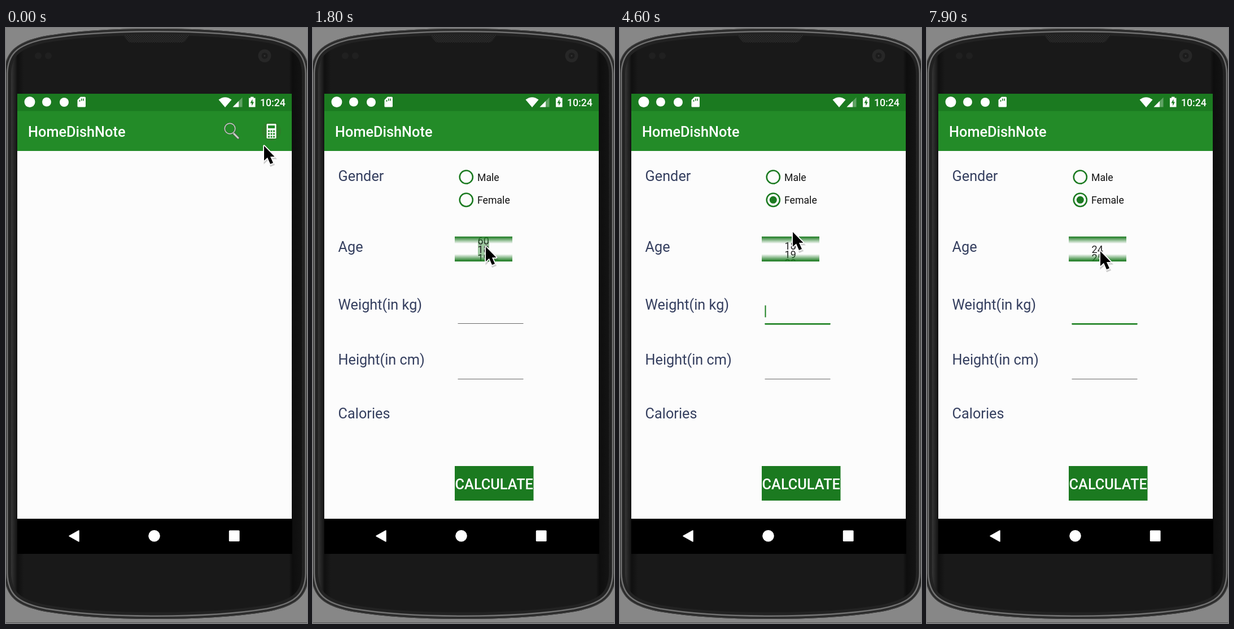
Recreate the animation shown at these times as an HTML page. Size 533 px wide and 1050 px high, loop 8 s.

```html
<!DOCTYPE html>
<html lang="en">
<head>
<meta charset="utf-8">
<title>Calorie form</title>
<style>
html, body { margin: 0; width: 100%; height: 100%; overflow: hidden; background: #878787; }
svg { display: block; width: 100%; height: 100%; font-family: Roboto, sans-serif; }
.title { font-size: 25.3px; font-weight: 500; fill: #fff; }
.label { font-size: 25.3px; fill: #353f5f; }
.option { font-size: 17.7px; fill: #111; }
.row { font-size: 18px; fill: #222; text-anchor: middle; }
.ring { fill: none; stroke: #1b7a20; stroke-width: 2.5; r: 11.6px; }

/* Everything shares one 8 s clock; a step is 100 ms = 1.25 %. */
.anim { animation: 8s step-end infinite; }
#home { animation-name: leave; }
#ripple { animation-name: ripple; }
#window { animation-name: open; }
#cursor { animation-name: point; }
#ring { animation-name: press; }
#dot { animation-name: check; }
#rows { animation-name: spin; }
#cover { animation-name: cover; transform-origin: 0 368px; }
#selection { animation-name: unselect; }
#focus { animation-name: focus; }
#caret { animation: blink 1s step-end infinite; }

@keyframes leave {
  0% { opacity: 1; }
  11.25% { opacity: .96; }
  13.75%, 100% { opacity: 1; }
}
@keyframes ripple {
  0% { opacity: .15; animation-timing-function: steps(3); }
  3.75%, 100% { opacity: 0; }
}
@keyframes open {
  0% { opacity: 0; transform: translateY(65px); }
  10% { opacity: .1; transform: translateY(58px); }
  11.25% { opacity: .67; transform: translateY(30.5px); }
  12.5% { opacity: .97; transform: translateY(4px); }
  13.75%, 100% { opacity: 1; transform: none; }
}
@keyframes point {
  0% { transform: translate(456px, 206px); animation-timing-function: steps(3); }
  3.75% { transform: translate(463px, 185px); }
  13.75% { transform: translate(463px, 185px); animation-timing-function: steps(7); }
  22.5% { transform: translate(305px, 384px); }
  27.5% { transform: translate(305px, 384px); animation-timing-function: steps(5); }
  33.75% { transform: translate(268px, 302px); }
  40% { transform: translate(268px, 302px); animation-timing-function: steps(10); }
  52.5% { transform: translate(305px, 390px); }
  55% { transform: translate(305px, 390px); animation-timing-function: steps(2); }
  57.5% { transform: translate(305px, 358px); animation-timing-function: steps(3); }
  61.25% { transform: translate(308px, 320px); animation-timing-function: steps(5); }
  67.5% { transform: translate(306px, 392px); animation-timing-function: steps(4); }
  72.5% { transform: translate(310px, 322px); animation-timing-function: steps(4); }
  77.5% { transform: translate(308px, 392px); animation-timing-function: steps(4); }
  82.5% { transform: translate(317px, 317px); }
  91.25% { transform: translate(317px, 317px); animation-timing-function: steps(6); }
  98.75%, 100% { transform: translate(306px, 392px); }
}
@keyframes press {
  0% { r: 11.6px; }
  37.5% { r: 10.4px; }
  38.75%, 100% { r: 11.6px; }
}
@keyframes check {
  0% { r: 0; }
  37.5% { r: 9.3px; }
  38.75%, 100% { r: 6.5px; }
}
@keyframes spin {
  0% { transform: none; }
  57.5% { transform: translateY(-6px); animation-timing-function: steps(3); }
  61.25% { transform: translateY(-30px); }
  67.5% { transform: translateY(-30px); animation-timing-function: steps(4); }
  72.5% { transform: translateY(-60px); }
  77.5% { transform: translateY(-60px); animation-timing-function: steps(4); }
  82.5% { transform: translateY(-89px); }
  90%, 100% { transform: translateY(-90px); }
}
@keyframes cover {
  0% { transform: scaleY(0); }
  57.5% { transform: scaleY(.62); }
  61.25%, 100% { transform: none; }
}
@keyframes unselect { 0% { opacity: 1; } 55%, 100% { opacity: 0; } }
@keyframes focus { 0% { opacity: 0; } 55%, 100% { opacity: 1; } }
@keyframes blink { 0% { opacity: 0; } 40% { opacity: 1; } 90%, 100% { opacity: 0; } }
</style>
</head>
<body>
<svg viewBox="0 0 533 1050" preserveAspectRatio="none">
  <defs>
    <linearGradient id="metal" gradientUnits="userSpaceOnUse" x2="533">
      <stop offset="0" stop-color="#2a2a2a"/><stop offset=".01" stop-color="#444"/>
      <stop offset=".02" stop-color="#303030"/><stop offset=".032" stop-color="#1c1c1c"/>
      <stop offset=".038" stop-color="#101010"/><stop offset=".06" stop-color="#191919"/>
      <stop offset=".94" stop-color="#191919"/><stop offset=".952" stop-color="#0e0e0e"/>
      <stop offset="1" stop-color="#161616"/>
    </linearGradient>
    <linearGradient id="fade" x2="0" y2="1">
      <stop offset="0" stop-color="#1b7a20"/><stop offset=".2" stop-color="#1b7a20" stop-opacity=".85"/>
      <stop offset="1" stop-color="#1b7a20" stop-opacity="0"/>
    </linearGradient>
    <pattern id="mesh" width="4" height="4" patternUnits="userSpaceOnUse">
      <rect width="4" height="4" fill="#2c2c2c"/><circle cx="1" cy="1" r=".9" fill="#151515"/><circle cx="3" cy="3" r=".9" fill="#151515"/>
    </pattern>
    <filter id="soft"><feGaussianBlur stdDeviation=".7"/></filter>
    <path id="body" d="M-3 80C-2 43 16 26 64 15C126 4 200 1 266 1S406 4 469 15C517 26 535 43 536 80V962C535 1003 515 1020 463 1030C402 1040 332 1043 266 1043S130 1040 70 1030C18 1020 -2 1003 -3 962Z"/>
    <clipPath id="shell"><use href="#body"/></clipPath>
    <clipPath id="wheel"><rect x="251" y="368" width="102" height="44"/></clipPath>
    <path id="arrow" d="M0 0V26L6 20.500L11 32L16 30L11 19H18.500Z"/>
    <g id="bars">
      <rect x="20" y="116" width="486" height="750" fill="#fcfcfc"/>
      <rect x="20" y="146" width="486" height="71" fill="#238b28"/>
      <rect x="20" y="116" width="486" height="30.500" fill="#1b7a20"/>
      <text class="title" x="39" y="192">HomeDishNote</text>
    </g>
  </defs>

  <!-- Phone -->
  <use href="#body" fill="url(#metal)"/>
  <g clip-path="url(#shell)">
    <g fill="none" filter="url(#soft)">
      <use href="#body" stroke="#222" stroke-width="24"/>
      <use href="#body" stroke="#707070" stroke-width="13"/>
      <use href="#body" stroke="#2b2b2b" stroke-width="8"/>
      <use href="#body" stroke="#444" stroke-width="2"/>
    </g>
  </g>
  <path d="M0 1049.500H533" stroke="#555"/>
  <path d="M207 12H326L317 23Q315 25.500 311 25.500H222Q218 25.500 216 23Z" fill="url(#mesh)"/>
  <g fill="#202020"><circle cx="57" cy="49" r="6"/><circle cx="75" cy="49" r="6"/></g>
  <circle cx="458" cy="49" r="11.500" fill="#272727"/><circle cx="458" cy="49" r="5.500" fill="#1c1c1c"/><circle cx="458" cy="49" r="1.500" fill="#333"/>
  <rect x="20" y="866" width="487" height="62"/>

  <!-- First screen -->
  <g id="home" class="anim">
    <use href="#bars"/>
    <circle id="ripple" class="anim" cx="470" cy="182" r="17" fill="#643"/>
    <g fill="none" stroke-linecap="round">
      <path d="M403.500 186.500L411 194" stroke="#526052" stroke-width="5"/>
      <path d="M403.500 186.500L411 194" stroke="#cbd5ca" stroke-width="2.800"/>
      <circle cx="396.500" cy="177.500" r="9.300" stroke="#526052" stroke-width="2.600"/>
      <circle cx="396.500" cy="177.500" r="9.300" stroke="#c6d5c5" stroke-width="1.400"/>
    </g>
    <rect x="461.500" y="169" width="17" height="26" rx="1.500" fill="#fff"/>
    <rect x="464" y="172" width="12" height="5" fill="#238b28"/>
    <path d="M464 182H476M464 187H476M464 192H476" stroke="#238b28" stroke-width="3" stroke-dasharray="3 1.500"/>
  </g>

  <!-- Form screen -->
  <g id="window" class="anim">
    <use href="#bars"/>
    <g class="label">
      <text x="44.500" y="270">Gender</text>
      <text x="44.500" y="395">Age</text>
      <text x="44.500" y="497">Weight(in kg)</text>
      <text x="44.500" y="594">Height(in cm)</text>
      <text x="44.500" y="689">Calories</text>
    </g>
    <circle class="ring" cx="271.300" cy="263"/>
    <circle id="ring" class="ring anim" cx="271.300" cy="303.300"/>
    <circle id="dot" class="anim" cx="271.300" cy="303.300" fill="#1b7a20"/>
    <text class="option" x="291" y="269.500">Male</text>
    <text class="option" x="291" y="310">Female</text>

    <g clip-path="url(#wheel)">
      <rect id="selection" class="anim" x="292" y="378" width="20" height="24" fill="#9fc8a1"/>
      <g id="rows" class="anim"></g>
      <rect id="cover" class="anim" x="251" y="368" width="102" height="16" fill="#fcfcfc"/>
      <rect x="251" y="367.500" width="102" height="13" fill="url(#fade)"/>
      <rect x="251" y="-412" width="102" height="13" transform="scale(1 -1)" fill="url(#fade)"/>
    </g>

    <path d="M256.500 521.500H372.500M256.500 619.500H372.500" stroke="#686868"/>
    <g id="focus" class="anim" fill="#1b8020">
      <rect x="256.500" y="521" width="116" height="2.600"/>
      <rect id="caret" x="256.500" y="489.500" width="2" height="21"/>
    </g>
    <rect x="251" y="773" width="139.500" height="61" fill="#1b7a20"/>
    <text class="title" x="320.700" y="814" text-anchor="middle">CALCULATE</text>
  </g>

  <!-- System bars -->
  <g fill="#fff">
    <circle cx="42" cy="130.500" r="9.500"/><circle cx="72" cy="130.500" r="8"/><circle cx="103" cy="131" r="8"/>
    <path d="M132 121.500H139.500Q141 121.500 141 123V138Q141 139.500 139.500 139.500H128Q126.500 139.500 126.500 138V127Z"/>
    <path d="M130.500 127V130M133.800 124.500V128.500M137 124.500V128.500" stroke="#1b7a20" stroke-width="1.500"/>
    <path d="M376.500 126.500Q388 118 399.500 126.500L388 140Z"/>
    <path d="M418.500 122.500V139.500H401.500Z" opacity=".3"/>
    <path d="M412 129V139.500H401.500Z"/>
    <path d="M433 121.500H438.500V123.500H441.500V139.500H430V123.500H433Z"/>
    <path d="M436.500 125.500L432.500 132.500H435.200V137.500L439 130.500H436.500Z" fill="#1b7a20"/>
    <text x="450" y="138" font-size="17.700" font-weight="500">10:24</text>
    <path d="M112 896.500L129 887V906Z" stroke="#fff" stroke-width="1.500" stroke-linejoin="round"/>
    <circle cx="262.500" cy="896.300" r="10.300"/>
    <rect x="394.800" y="886.500" width="18.800" height="19.500" rx="1.500"/>
  </g>

  <g id="cursor" class="anim">
    <use href="#arrow" x="2" y="5" stroke="#000" stroke-width="3" opacity=".18"/>
    <use href="#arrow" x="1" y="2" stroke="#fff" stroke-width="3.500" stroke-linejoin="round" paint-order="stroke"/>
  </g>
</svg>
<script>
const rowPitch = 14.95;
const ages = [60, ...Array.from({ length: 9 }, (_, i) => 18 + i)];
document.getElementById('rows').innerHTML = ages.map((age, i) =>
  `<text class="row" x="301.7" y="${397 + (i - 1) * rowPitch}">${age}</text>`).join('');
</script>
</body>
</html>
```
